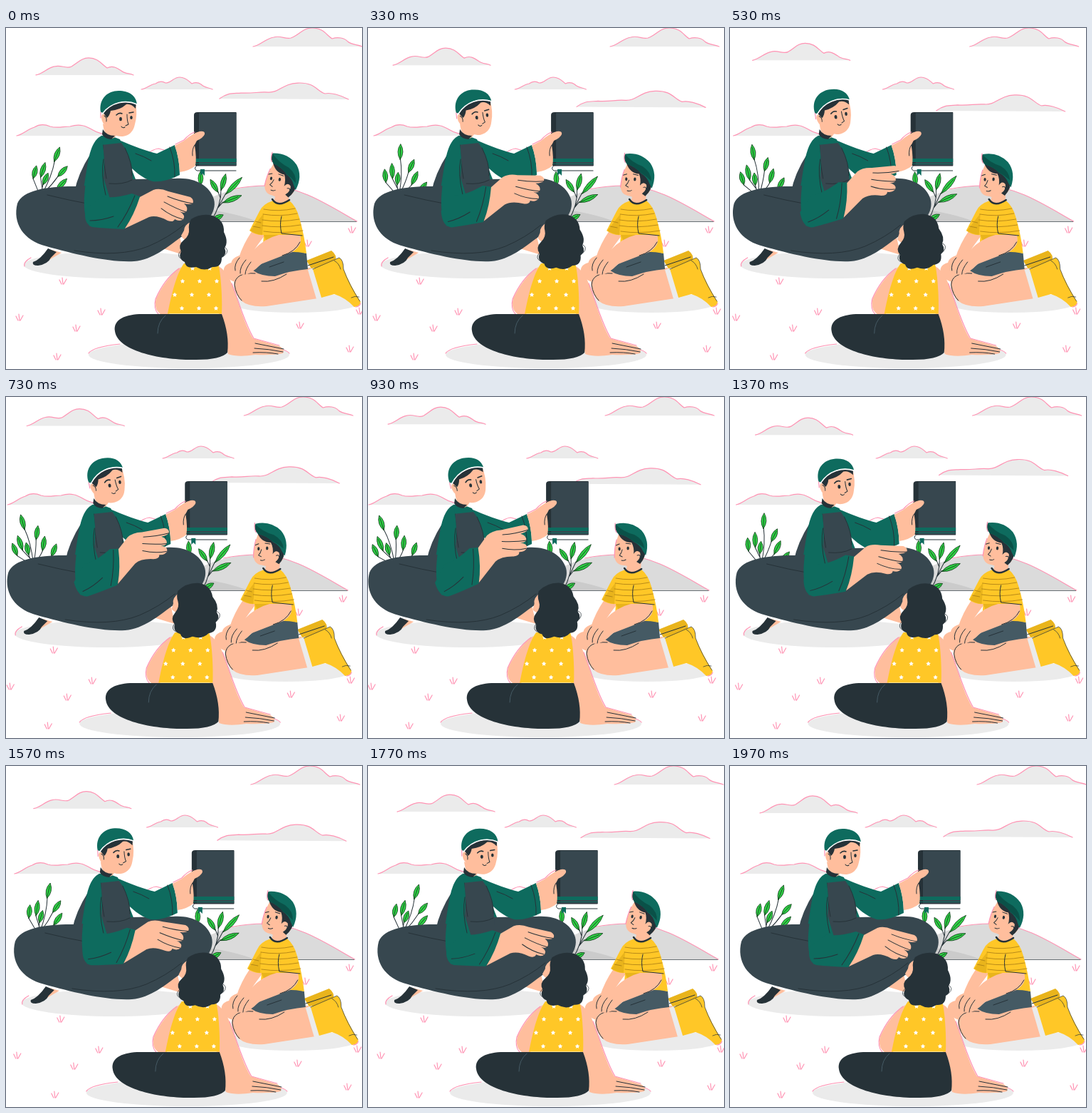
An HTML page for the animation above (2010 ms loop, 500 by 478 pixels).

```html
<!DOCTYPE html>
<html lang="en">
<head>
<meta charset="utf-8">
<title>Story time outdoors</title>
<style>
html, body { margin: 0; width: 100%; height: 100%; overflow: hidden; background: #fff; }
svg { display: block; width: 100vw; height: 100vh; }
path { stroke-linejoin: round; stroke-linecap: round; }
.cloud { fill: #ebebeb; }
.pink { fill: none; stroke: #ff94b4; stroke-width: 1.2; }
.line { fill: none; stroke: #263238; stroke-width: 1; }
.thin { fill: none; stroke: #263238; stroke-width: .7; }
.stripe { fill: none; stroke: #a67c16; stroke-width: .8; }
.dark { fill: #263238; }
.slate { fill: #37474f; }
.short { fill: #455a64; }
.skin { fill: #ffbe9d; }
.teal { fill: #0e6b5e; }
.deep { fill: #0a5148; }
.gold { fill: #ffc727; }
.amber { fill: #e9b41c; }
.leaf { fill: #2fd045; stroke: #12401c; stroke-width: .8; }
.white { fill: #fff; }
</style>
</head>
<body>
<svg viewBox="0 0 500 478">
<g id="cam">
  <g id="clouds"></g>

  <!-- hill -->
  <path fill="#dbdbdb" d="M270 248C305 226 338 221 368 221C414 222 452 248 493 271H270Z"/>
  <path fill="#cbcbcb" d="M280 254Q325 260 352 271H280Z"/>
  <path class="pink" d="M318 226Q342 221 368 221C414 222 452 248 493 271"/>
  <path class="thin" d="M290 271.500H492"/>

  <g id="plantL"><path class="line" d="M51 232Q46 204 36 186M52 230Q54 214 53 200M53 232Q60 224 63 215M56 234Q70 228 76 222M48 228L35 216M49 232L44 222M46 234L28 224"/></g>
  <g id="plantR"><path class="line" d="M288 271Q301 248 299 226M297 250L306 231M296 252L303 243M299 238L295 229M278 250L270 222"/></g>

  <!-- ground shadows -->
  <g class="cloud">
    <ellipse cx="155" cy="332" rx="130" ry="19"/>
    <ellipse cx="405" cy="385" rx="92" ry="14"/>
    <ellipse cx="257" cy="458" rx="141" ry="19"/>
  </g>
  <path class="pink" d="M35 322Q24 328 26 334M116 456Q122 447 160 443M345 443Q392 448 398 456"/>
  <g id="grass"></g>

  <!-- woman: legs and torso -->
  <path class="skin" d="M64 311L78 315L59 326Z"/>
  <path class="dark" d="M59 309Q48 325 38 328Q36 333 45 333Q59 331 63 322L71 314Z"/>
  <path class="skin" d="M217 308L244 292L250 318Q236 314 217 308Z"/>
  <path class="slate" d="M119 176Q101 204 96 230H122Z"/>
  <path class="teal" d="M134 151C121 158 117 175 113 200L108 232H172L182 212L160 156Q146 150 134 151Z"/>
  <path class="pink" d="M198 177Q206 170 214 169L222 171"/>
  <path class="slate" d="M104 222C62 221 24 226 16 246C9 273 24 298 57 306C96 317 145 329 180 327C206 325 228 306 246 293C280 280 297 259 292 240C286 220 264 209 238 211L178 212Z"/>
  <path class="line" d="M58 234Q90 242 119 247M96 312Q160 322 200 306Q228 294 250 276"/>

  <!-- book arm -->
  <path class="teal" d="M156 156C180 166 199 173 212 176L237 164Q244 184 244 206Q222 217 206 215C190 210 180 200 170 190Z"/>
  <path class="line" d="M182 176Q194 180 204 186M230 167Q238 188 237 209"/>
  <path class="dark" d="M264 122Q264 118 269 118H323.500V193H264Z"/>
  <path class="slate" d="M271 119H323.500V193H271Z"/>
  <path class="teal" d="M264 183H323.500V188H264ZM264 190H323.500V191H264Z"/>
  <path class="white" d="M268 193H323V200H268Q264 197 268 193Z"/>
  <path class="line" d="M323 193H268Q263 197 268 200H323M270 119V183"/>
  <path class="teal" d="M273 198H279V207L276 204L273 207Z"/>
  <path class="skin" d="M237 165L250 158Q263 147 272 145Q280 144 279 149Q277 154 268 158L265 164Q268 183 266 193Q258 200 244 202Q243 181 237 165Z"/>
  <path class="pink" d="M238 163L250 157Q258 148 265 146"/>
  <path class="line" d="M265 164Q261 170 262 179"/>

  <!-- apron, neck and upper arm -->
  <path class="slate" d="M134 164L162 161C171 173 177 191 178 212V223H126Z"/>
  <path class="line" d="M136 164Q137 190 141 211M167 168Q178 190 177 207M145 218Q164 220 177 213"/>
  <path class="skin" d="M136 134L158 145Q154 155 147 155Q138 152 136 134Z"/>
  <path class="dark" d="M136 142Q141 151 153 151L148 156Q138 155 135 149Z"/>
  <path class="teal" d="M134 152C119 161 115 190 111 225C108 252 111 270 118 278L150 252L137 210Q140 180 134 152Z"/>
  <path class="line" d="M137 184Q133 205 140 234"/>

  <g id="forearm">
    <path class="teal" d="M112 253Q108 274 121 279Q140 281 166 282Q180 262 190 237L177 232Q150 240 136 236Z"/>
    <path class="line" d="M181 235Q171 260 157 279M118 270Q134 270 151 264"/>
    <path class="skin" d="M188 237L207 227Q216 224 228 229L259 237Q265 241 262 246Q257 248 250 246Q257 252 253 258Q249 260 244 257Q253 263 249 268Q244 272 237 268Q235 273 227 270Q212 262 201 265L167 281Q180 262 188 237Z"/>
    <path class="line" d="M262 246Q244 243 227 236M253 258Q240 254 222 244M248 268Q232 264 218 253"/>
  </g>

  <g id="womanHead">
    <path class="skin" d="M140 112L182 104Q185 122 181 135Q178 150 164 152Q149 153 142 138Q134 134 134 124Q135 118 140 122Z"/>
    <path class="dark" d="M136 118Q150 101 183 104L182 113Q176 106 169 107Q160 115 147 116Q146 122 142 126Z"/>
    <path class="teal" d="M133 118C130 99 143 88 158 88C173 88 183 95 184 107C168 99 148 104 137 119Z"/>
    <path d="M136 119.500C148 104 168 100 184 107" fill="none" stroke="#fff" stroke-width="1.600"/>
    <g class="dark"><ellipse cx="161" cy="127.500" rx="2" ry="2.700"/><ellipse cx="176" cy="125.500" rx="1.800" ry="2.600"/></g>
    <path d="M155 122Q159 118 163 120M173 119L179 118" fill="none" stroke="#263238" stroke-width="1.600"/>
    <path class="line" d="M170 121Q170 130 172 135L168 137M162 138Q164 141 167 139M138 123Q142 125 141 131"/>
    <path class="pink" d="M133 118V126"/>
  </g>

  <!-- boy -->
  <path class="amber" d="M422 326L457 312Q465 318 463 326L430 339Z"/>
  <path class="line" d="M424 333L460 321"/>
  <path class="skin" d="M320 328Q304 331 306 342Q312 356 326 356L345 342Z"/>
  <path class="skin" d="M347 338Q330 337 322 348Q316 366 330 382Q342 392 366 390L438 379L428 336Q400 338 376 345Z"/>
  <path class="line" d="M350 344Q322 342 321 360Q323 374 331 382"/>
  <path fill="#ebebeb" d="M424 339L433 336L443 377L436 380Z"/>
  <path class="gold" d="M431 338L468 322Q474 325 474 338Q483 360 498 384Q497 391 489 391Q477 378 461 373L443 378Z"/>
  <path class="thin" d="M431 338L468 322Q474 325 474 338Q482 360 497 383M461 326Q468 330 470 338M485 378Q490 375 496 377"/>
  <path class="pink" d="M491 391Q496 391 498 386"/>
  <path class="short" d="M347 340L372 320Q400 308 422 316L424 338Q400 340 378 348Q358 348 347 340Z"/>
  <path class="line" d="M359 355Q376 357 394 345M390 328L370 335"/>
  <path class="skin" d="M346 284L364 290Q354 303 348 312L327 322Q333 303 346 284Z"/>
  <path class="gold" d="M375 242Q360 247 356 257L342 284Q351 291 362 290L361 304L390 314Q408 313 422 316Q419 290 412 266Q408 250 397 241Z"/>
  <path class="amber" d="M343 284L362 260L360 290Q350 289 343 284ZM362 290L386 290L366 300Z"/>
  <path class="stripe" d="M362 254Q382 258 406 253M361 261Q384 265 409 260M360 269Q384 273 412 268M360 277Q384 281 414 276M362 285Q388 289 417 284M350 271L358 273M347 278L357 280"/>
  <path class="skin" d="M383 290L413 290Q418 305 402 314L358 331Q345 345 334 346Q324 346 317 334Q314 325 325 320L348 311Q363 295 383 290Z"/>
  <path class="line" d="M387 264Q384 275 387 288L416 291M328 322Q320 331 322 340M337 325Q328 335 329 344M344 328Q336 338 336 345M413 300Q406 314 388 319"/>
  <path class="skin" d="M380 229L398 224L397 242Q388 250 376 244Z"/>
  <path d="M374 240Q382 252 398 241" fill="none" stroke="#263238" stroke-width="2.500"/>

  <g id="boyHead">
    <path class="skin" d="M366 192Q360 208 360 224Q362 236 374 236Q385 240 394 233Q403 230 402 220L396 200Z"/>
    <path class="dark" d="M365 191Q371 204 384 204Q388 211 387 220Q391 213 396 218Q398 225 391 231L396 234Q404 225 404 213Q396 195 380 191Z"/>
    <path class="teal" d="M362 178Q383 173 398 187Q410 201 404 222L400 216Q396 207 387 203Q379 195 366 192Q360 186 362 178Z"/>
    <path class="deep" d="M361 178Q360 188 366 192Q377 194 386 202Q395 206 402 212Q401 200 388 193Q372 189 361 178Z"/>
    <g class="dark"><ellipse cx="367" cy="213" rx="1.600" ry="2.400"/><ellipse cx="379" cy="212" rx="1.700" ry="2.500"/></g>
    <path class="line" d="M362 208L367 206M376 205L383 206M371 214Q370 219 367 222L371 224M370 229Q373 230 376 228M392 222Q397 220 396 226"/>
    <path class="pink" d="M363 200Q360 211 360 225M361 177Q360 186 363 190"/>
  </g>

  <!-- girl -->
  <path class="skin" d="M246 335Q224 351 211 379Q207 394 217 401L228 404L242 365Z"/>
  <path class="pink" d="M243 337Q222 352 210 380Q207 394 214 401"/>
  <path class="skin" d="M296 332Q311 341 316 356C325 378 334 414 347 435L384 446Q392 450 389 456Q375 459 350 458Q325 462 312 457L298 396Z"/>
  <path class="pink" d="M317 358C326 380 335 414 348 435L384 445"/>
  <path class="line" d="M350 442Q370 446 390 450M349 449Q370 450 389 454M347 455Q366 454 382 457"/>
  <path class="dark" d="M153 425C150 407 171 400 196 401H303Q314 430 311 455Q302 465 267 465C218 466 157 453 153 425Z"/>
  <path d="M224 403Q213 412 213 428" fill="none" stroke="#455a64"/>
  <path class="gold" d="M250 330C239 345 232 375 227 400.500H303C304 380 302 345 298 330Z"/>
  <g id="stars"></g>
  <g id="girlHead">
    <path class="skin" d="M261 271Q250 276 250 284L246 291Q248 297 258 299L268 284Z"/>
    <path class="dark" d="M260 268Q274 259 290 263Q307 269 306 286Q313 300 307 308Q311 318 303 322Q303 336 290 335Q279 342 267 335Q252 338 251 328Q241 323 246 313Q241 304 250 297Q258 291 257 282Q256 275 260 268Z"/>
    <path class="thin" d="M305 306Q316 311 307 319M246 312Q239 318 245 323"/>
  </g>
</g>
</svg>
<script>
const $ = id => document.getElementById(id);
const LOOP = 2010, HALF = LOOP / 2;

// Each cloud: top edge, then its own drift in x and y
const clouds = [
  ["M42 66C52 64 58 56 68 54C78 51 84 58 92 54C102 48 106 42 116 42C130 42 134 51 142 56C150 52 156 56 162 60C168 65 174 63 179 66", 0, -28],
  ["M190 86C198 85 202 79 210 78Q217 73 224 77C232 77 235 69 244 69C253 69 257 75 261 78Q268 75 274 79C279 84 284 83 290 86", 47, 0],
  ["M347 26C358 24 364 15 376 13C386 10 392 16 400 14C412 10 416 0 430 0C446 0 450 10 458 15C466 12 476 14 480 19C486 24 494 23 500 26", 0, 0],
  ["M300 99C312 90 320 92 330 91C348 92 354 89 368 90C384 91 388 78 410 77C434 76 436 88 448 92C456 90 470 94 481 100", 0, 23],
  ["M15 151C24 149 30 142 40 139C48 134 55 135 62 138C72 141 80 138 90 138C104 134 112 137 122 143C130 148 134 147 142 151", 0, 0]
];
$("clouds").innerHTML = clouds.map(([d]) =>
  `<g><path class="cloud" d="${d}Z"/><path class="pink" d="${d}"/></g>`).join("");

// Leaves: base point, angle from upright and length
const leaf = ([x, y, angle, len]) =>
  `<g transform="translate(${x} ${y}) rotate(${angle})"><path class="leaf" d="M0 0Q-7 ${-len * .5} 0 ${-len}Q7 ${-len * .5} 0 0V${-len * .8}"/></g>`;
$("plantL").innerHTML += [
  [36, 187, -18, 22], [53, 200, 4, 20], [63, 215, 5, 21], [76, 222, 18, 19],
  [35, 216, -22, 22], [44, 222, -15, 18], [28, 224, -25, 19]
].map(leaf).join("");
$("plantR").innerHTML += [
  [299, 227, 12, 24], [306, 232, 40, 33], [303, 244, 65, 28], [270, 222, -4, 20],
  [295, 230, -35, 21], [289, 270, 60, 18]
].map(leaf).join("");

$("grass").innerHTML = [
  [80, 359], [134, 402], [99, 425], [72, 465], [19, 410], [486, 287],
  [424, 306], [413, 421], [483, 454], [497, 401]
].map(([x, y]) => `<path class="pink" d="M${x - 2} ${y}L${x - 5} ${y - 6}M${x} ${y}L${x - 1} ${y - 9}M${x + 1} ${y}L${x + 5} ${y - 7}"/>`).join("");

const star = (x, y) => {
  const pts = Array.from({ length: 10 }, (_, i) => {
    const r = i % 2 ? 1.7 : 3.5, a = i * Math.PI / 5;
    return [x + r * Math.sin(a), y - r * Math.cos(a)].map(n => n.toFixed(1));
  });
  return `<polygon class="white" points="${pts.join(" ")}"/>`;
};
$("stars").innerHTML = [[262, 337, 2], [248, 355, 3], [237, 374, 3], [247, 393, 3]]
  .map(([x, y, n]) => Array.from({ length: n }, (_, i) => star(x + 24 * i, y)).join("")).join("");

// Swinging parts: first angle, last angle and pivot
const swings = {
  plantL: [39, 0, 51, 232], plantR: [4, 0, 292, 270], forearm: [0, -27, 125, 265],
  womanHead: [0, -12, 142, 140], boyHead: [12, 0, 380, 238], girlHead: [0, -13, 275, 298]
};
const move = (el, x, y) => el.setAttribute("transform", `translate(${x} ${y})`);

function draw(now) {
  const u = now % LOOP / HALF;
  const out = Math.sin((u % 1) * Math.PI / 2);
  const p = u < 1 ? out : 1 - out;
  move($("cam"), -14 * p, 0);
  clouds.forEach(([, x, y], i) => move($("clouds").children[i], x * p, y * p));
  for (const [id, [from, to, x, y]] of Object.entries(swings))
    $(id).setAttribute("transform", `rotate(${from + (to - from) * p} ${x} ${y})`);
}

const start = performance.now();
function tick() {
  draw(performance.now() - start);
  requestAnimationFrame(tick);
}
tick();
</script>
</body>
</html>
```
